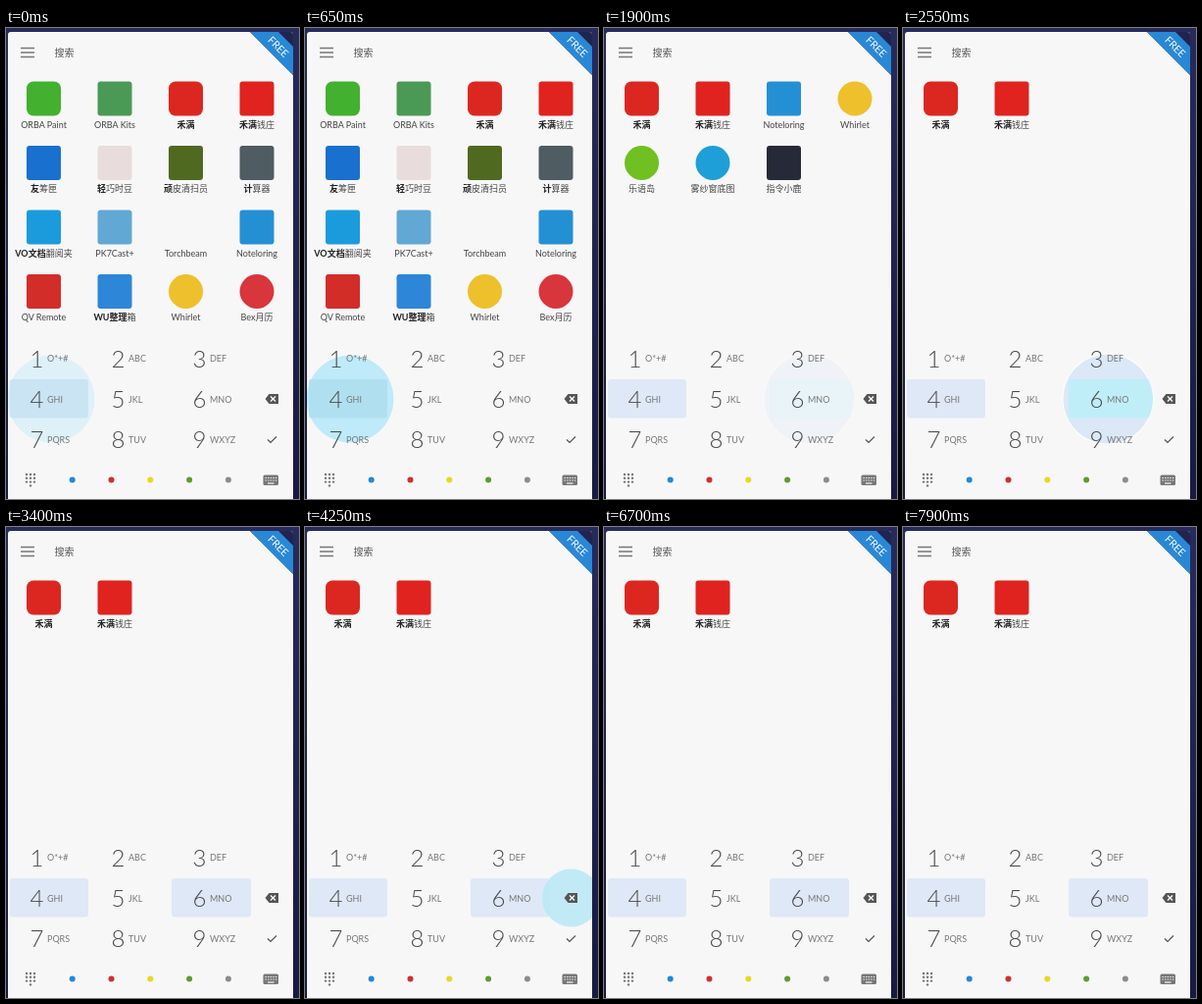
Write an HTML page that moves like this. It is 299 by 480 pixels and loops after 8000 ms.

```html
<!DOCTYPE html>
<html lang="zh">
<head>
<meta charset="utf-8">
<title>T9 launcher</title>
<style>
html, body { margin: 0; width: 100%; height: 100%; overflow: hidden; background: #20244f; }
svg { display: block; width: 100%; height: 100%; }
text { font-family: Lato, "Noto Sans CJK SC", "Noto Sans CJK", sans-serif; fill: #555; }
.label { font-size: 9px; text-anchor: middle; fill: #444; }
.label .hit { font-weight: 700; fill: #222; }
.digit { font-size: 24px; font-weight: 300; fill: #4a4a4a; }
.letters { font-size: 9px; fill: #777; }
.held { fill: #dfe8f6; }
.list, .touch, #held6 { animation: 8s linear infinite; }
.list, #held6 { animation-timing-function: step-end; }
#all { animation-name: all; }
#some { animation-name: some; }
#few { animation-name: few; }
#held6 { animation-name: few; }
#touch4 { animation-name: touch4; }
#touch6 { animation-name: touch6; }
#touchDel { animation-name: touchDel; }
@keyframes all { 0% { opacity: 1 } 12.5%, 100% { opacity: 0 } }
@keyframes some { 0% { opacity: 0 } 12.5% { opacity: 1 } 28.125%, 100% { opacity: 0 } }
@keyframes few { 0% { opacity: 0 } 28.125%, 100% { opacity: 1 } }
@keyframes touch4 {
  0% { opacity: .42 } 8.75%, 15.625% { opacity: 1 } 20.625%, 100% { opacity: 0 }
}
@keyframes touch6 {
  0%, 22.5% { opacity: 0 } 27.5%, 32.5% { opacity: 1 } 40%, 100% { opacity: 0 }
}
@keyframes touchDel {
  0%, 44% { opacity: 0 } 49%, 53.125% { opacity: 1 } 62%, 100% { opacity: 0 }
}
</style>
</head>
<body>
<svg viewBox="0 0 299 480" preserveAspectRatio="none">
  <defs>
    <linearGradient id="night" x2="0" y2="1">
      <stop stop-color="#262b5c"/><stop offset="1" stop-color="#171a42"/>
    </linearGradient>
    <clipPath id="screen"><rect x="2" y="4" width="291" height="480" rx="3"/></clipPath>
    <clipPath id="disc6"><circle cx="209" cy="378" r="46"/></clipPath>
  </defs>
  <rect width="299" height="480" fill="url(#night)"/>
  <rect x="2" y="4" width="291" height="480" rx="3" fill="#f7f7f7"/>

  <g clip-path="url(#screen)">
    <path d="M249 4H293V48Z" fill="#20244f"/>
    <path d="M249 4H278L293 19V48Z" fill="#2988d6"/>
  </g>
  <text transform="translate(278 19) rotate(45)" text-anchor="middle" y="4"
    style="font-size:10.5px;fill:#fff">FREE</text>

  <path d="M15 20.5H29M15 25H29M15 29.5H29" stroke="#777" stroke-width="1.4"/>
  <text x="49.5" y="28.7" font-size="10">搜索</text>

  <g id="all" class="list"></g>
  <g id="some" class="list"></g>
  <g id="few" class="list"></g>

  <rect class="held" x="4" y="358" width="80" height="39.500" rx="3"/>
  <rect class="held" id="held6" x="169" y="358" width="81" height="39.500" rx="3"/>

  <g id="touch4" class="touch" clip-path="url(#screen)">
    <circle cx="46" cy="378" r="44.500" fill="#bdeafa"/>
    <rect x="4" y="358" width="80" height="39.500" rx="3" fill="#aee0ef"/>
  </g>
  <g id="touch6" class="touch">
    <circle cx="209" cy="378" r="46.500" fill="#fff"/>
    <circle cx="209" cy="378" r="45.500" fill="#dbe8f7"/>
    <rect x="169" y="358" width="87" height="39.500" rx="3" fill="#bfeef9" clip-path="url(#disc6)"/>
  </g>
  <g id="touchDel" class="touch">
    <circle cx="271.500" cy="378" r="29.500" fill="#b9e9f7" fill-opacity=".85" clip-path="url(#screen)"/>
  </g>

  <g id="keys"></g>

  <path d="M264.500 378L268.500 373H278V383H268.500Z" fill="#555"/>
  <path d="M270 375.500L275 380.500M275 375.500L270 380.500" stroke="#fff" stroke-width="1.300"/>
  <path d="M267 419.500L270 422.500L276 416.500" fill="none" stroke="#555" stroke-width="1.200"/>
  <g id="dots"></g>
  <rect x="262.500" y="455.500" width="15.500" height="10.500" rx="1.500" fill="#777"/>
  <path d="M264.500 458.500H276.500M264.500 461H276.500" stroke="#f7f7f7" stroke-width="1.200" stroke-dasharray="1.400 1.200"/>
  <path d="M267 464H273.500" stroke="#f7f7f7" stroke-width="1.200"/>
</svg>
<script>
const byId = id => document.getElementById(id);

// Each app: label (matched part before "|"), colour, round shape
const apps = {
  brush: ['ORBA Paint', '#43b02f'],
  tools: ['ORBA Kits', '#4a9a55'],
  shop: ['禾满|', '#dc2721'],
  bank: ['禾满|钱庄', '#e0231f'],
  loan: ['友|筹匣', '#1a70cf'],
  timer: ['轻|巧时豆', '#e9dcdc'],
  guard: ['顽|皮清扫员', '#4f6a20'],
  calc: ['计|算器', '#4f5c62'],
  files: ['VO文档|翻阅夹', '#1c9bdc'],
  live: ['PK7Cast+', '#62a8d4'],
  torch: ['Torchbeam'],
  pins: ['Noteloring', '#2490d4'],
  remote: ['QV Remote', '#d32d2a'],
  manage: ['WU整理|箱', '#2d86d8'],
  spin: ['Whirlet', '#eec02c', true],
  dates: ['Bex月历', '#d9353d', true],
  words: ['乐语岛', '#6fc020', true],
  glass: ['雾纱窗底图', '#1e9fd8', true],
  script: ['指令小鹿', '#262a38']
};

function drawApp(name, i) {
  const [label, color, round] = apps[name];
  const x = 38.5 + 72.5 * (i % 4), y = 72 + 65.5 * Math.floor(i / 4);
  const icon = !color ? '' : round
    ? `<circle cx="${x}" cy="${y}" r="17.5" fill="${color}"/>`
    : `<rect x="${x - 17.5}" y="${y - 17.5}" width="35" height="35" rx="${name === 'shop' || name === 'brush' ? 7 : 3}" fill="${color}"/>`;
  const [hit, rest] = label.includes('|') ? label.split('|') : ['', label];
  return `${icon}<text class="label" x="${x}" y="${y + 29.5}"><tspan class="hit">${hit}</tspan>${rest}</text>`;
}

const fill = (id, names) => byId(id).innerHTML = names.map(drawApp).join('');
fill('all', Object.keys(apps).slice(0, 16));
fill('some', ['shop', 'bank', 'pins', 'spin', 'words', 'glass', 'script']);
fill('few', ['shop', 'bank']);

byId('keys').innerHTML = ['O*+#', 'ABC', 'DEF', 'GHI', 'JKL', 'MNO', 'PQRS', 'TUV', 'WXYZ']
  .map((letters, i) => {
    const x = 24.5 + 83 * (i % 3), y = 337 + 41.3 * Math.floor(i / 3);
    return `<text class="digit" x="${x}" y="${y + 8.5}">${i + 1}</text>
      <text class="letters" x="${x + 17.5}" y="${y + 3.2}">${letters}</text>`;
  }).join('');

const dot = (x, y, r, color) => `<circle cx="${x}" cy="${y}" r="${r}" fill="${color}"/>`;
const pages = ['#1e88e0', '#d02f2f', '#e8d822', '#5a9e2c', '#8c8c8c'];
const pad = Array.from({ length: 10 }, (_, i) =>
  i < 9 ? [21 + 4 * (i % 3), 455 + 3.8 * Math.floor(i / 3)] : [25, 466.4]);
byId('dots').innerHTML = pages.map((c, i) => dot(67.7 + 39.8 * i, 460.5, 3, c)).join('')
  + pad.map(([x, y]) => dot(x, y, 1.2, '#777')).join('');
</script>
</body>
</html>
```
